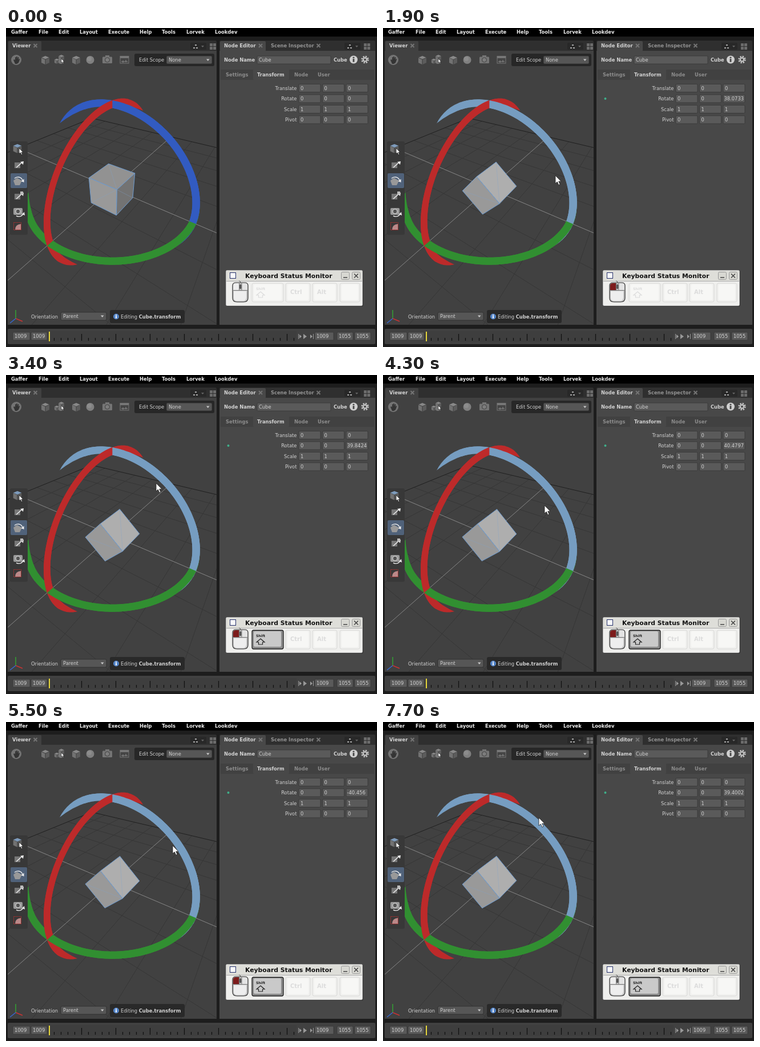
Recreate the animation shown at these times as an HTML page. Size 650 by 560 pixels, loop 8000 ms.

```html
<!DOCTYPE html>
<html lang="en">
<head>
<meta charset="utf-8">
<title>Rotate tool</title>
<style>
html, body { margin: 0; width: 100%; height: 100%; overflow: hidden; background: #1d1d1d; }
svg { display: block; width: 650px; height: 560px; }
text { font: 8.35px "DejaVu Sans", sans-serif; fill: #d2d2d2; white-space: pre; }
.b { font-weight: bold; }
</style>
</head>
<body>
<svg id="stage" viewBox="0 0 650 560"></svg>
<script>
const stage = document.getElementById('stage');
const rect = (x, y, w, h, fill, extra = '') =>
  `<rect x="${x}" y="${y}" width="${w}" height="${h}" fill="${fill}" ${extra}/>`;
const text = (x, y, s, extra = '') => `<text x="${x}" y="${y}" ${extra}>${s}</text>`;
const path = (d, fill = 'none', extra = '') => `<path d="${d}" fill="${fill}" ${extra}/>`;
const line = (d, color, w = 1) => path(d, 'none', `stroke="${color}" stroke-width="${w}"`);
const group = (x, y, s) => `<g transform="translate(${x} ${y})">${s}</g>`;
const bold = 'class="b"';

// Perspective camera orbiting the origin; units are handle radii.
const YAW = 0.608, PITCH = 0.66, DIST = 2.36, ZOOM = 332, CX = 186.2, CY = 281.7;
const sy = Math.sin(YAW), cy = Math.cos(YAW), sp = Math.sin(PITCH), cp = Math.cos(PITCH);
const depth = ([x, y, z]) => x * sy * cp + z * cy * cp + y * sp;
function project(p) {
  const [x, y, z] = p, k = ZOOM / (DIST - depth(p));
  return [CX + k * (x * cy - z * sy), CY + k * (x * sy * sp + z * cy * sp - y * cp)];
}
const poly = (points, close = 'Z') =>
  'M' + points.map(p => project(p).map(v => v.toFixed(2)).join(' ')).join('L') + close;

// Floor grid
const UNIT = 0.395;
function floorGrid() {
  const end = 5 * UNIT;
  let minor = '', edge = '', axis = '';
  for (let i = -5; i <= 5; i++) {
    const k = i * UNIT;
    const d = poly([[k, 0, -end], [k, 0, end]], '') + poly([[-end, 0, k], [end, 0, k]], '');
    if (i === 0) axis += d;
    else if (Math.abs(i) === 5) edge += d;
    else minor += d;
  }
  return line(minor, '#363636') + line(edge, '#1f1f1f') + line(axis, '#868686');
}

// Rotation rings: flat bands partly hidden behind an invisible sphere
const INNER = 0.955, OUTER = 1.022, SPHERE = 147;
const ringPoint = {
  z: (c, s) => [c, s, 0],
  x: (c, s) => [0, c, s],
  y: (c, s) => [s, 0, c]
};
const onRing = (axis, deg, r) =>
  ringPoint[axis](r * Math.cos(deg * Math.PI / 180), r * Math.sin(deg * Math.PI / 180));
function band(axis, from, to) {
  const outer = [], inner = [];
  for (let i = 0; i <= 90; i++) {
    const a = from + (to - from) * i / 90;
    outer.push(onRing(axis, a, OUTER));
    inner.unshift(onRing(axis, a, INNER));
  }
  return poly(outer.concat(inner));
}
function frontArc(axis) {
  const visible = a => depth(onRing(axis, a, 1)) > 0.4;
  let from = 45, to = 45;
  while (visible(from)) from--;
  while (visible(to)) to++;
  return [from, to];
}
function rings() {
  const paint = arc => [['z', 'inherit'], ['y', '#318f31'], ['x', '#bd2a2a']]
    .map(([axis, color]) => path(band(axis, ...arc(axis)), color)).join('');
  return `<clipPath id="outside"><path clip-rule="evenodd" d="M0 40H370V520H0Z
    M${CX - SPHERE} ${CY}a${SPHERE} ${SPHERE} 0 1 0 ${2 * SPHERE} 0a${SPHERE} ${SPHERE} 0 1 0 ${-2 * SPHERE} 0Z"/></clipPath>
    <g id="rings"><g clip-path="url(#outside)">${paint(() => [0, 360])}</g>
    ${paint(frontArc)}${paint(() => [0, 90])}</g>`;
}

// Cube, corners indexed by sign bits
const HALF = 0.195;
const FACES = ['1375', '0462', '2673', '0154', '4576', '0231'].map(s => [...s].map(Number));
function cube(deg) {
  const c = Math.cos(deg * Math.PI / 180), s = Math.sin(deg * Math.PI / 180);
  const corners = Array.from({ length: 8 }, (_, i) => {
    const x = i & 1 ? HALF : -HALF, y = i & 2 ? HALF : -HALF, z = i & 4 ? HALF : -HALF;
    return [x * c - y * s, x * s + y * c, z];
  });
  return FACES.map(face => {
    const pts = face.map(i => corners[i]);
    const normal = [0, 1, 2].map(k => pts.reduce((sum, p) => sum + p[k], 0) / 4 / HALF);
    const facing = depth(normal) - HALF / DIST;
    if (facing <= 0) return '';
    const g = Math.round(45 + 190 * facing);
    return path(poly(pts), `rgb(${g},${g},${g})`, 'stroke="#6c9bd0" stroke-width="1" stroke-linejoin="round"') +
      path(poly([pts[0], pts[2]], ''), 'none', 'stroke="#7fa3cc" stroke-width=".6" opacity=".6"');
  }).join('');
}

// Interface pieces
const ARROW = 'M0 0V14L3.3 11L5.8 16.6L8.1 15.5L5.7 10.2H10Z';
const pointer = (x, y, k) => `<path d="${ARROW}" transform="translate(${x} ${y}) scale(${k})" fill="#fff" stroke="#111"/>`;
const closeMark = (x, y) => line(`M${x - 3} ${y - 3}l6 6m0 -6l-6 6`, '#747474', 2);
const field = (x, y, w, s, id = '') => rect(x, y, w, 14, '#5a5a5a', 'rx="1.5" stroke="#353535" stroke-width=".8"') +
  text(x + 3, y + 10.3, s, id);
const boxIcon = (x, y, k, top = '#888') => `<g transform="translate(${x} ${y}) scale(${k})">` +
  path('M0 -7L7 -4L0 -1L-7 -4Z', top) + path('M-7 -3.5L-.5 -.6V8L-7 5Z', '#727272') +
  path('M7 -3.5L.5 -.6V8L7 5Z', '#5c5c5c') + '</g>';
const panelButtons = x => rect(x, 26, 28, 12, '#282828', 'rx="2"') +
  path(`M${x + 5} 34h3v2h-3zM${x + 10} 34h3v2h-3zM${x + 8} 29h3v2h-3z`, '#aaa') + path(`M${x + 19} 31h5l-2.5 3z`, '#666') +
  [0, 6].map(dx => [0, 6].map(dy => rect(x + 34 + dx, 27 + dy, 5, 5, '#6c6c6c')).join('')).join('');
const dropdown = (x, y, w, s) => rect(x, y, w, 14, '#565656', 'rx="2" stroke="#2c2c2c" stroke-width=".8"') +
  text(x + 4, y + 10, s) + path(`M${x + w - 10} ${y + 5.5}h5.5l-2.75 3.5z`, '#c8c8c8');
const info = (x, y, r, color, mark) => `<circle cx="${x}" cy="${y}" r="${r}" fill="${color}"/>` +
  rect(x - r / 5, y - r / 5, r / 2.5, r * .8, mark) + rect(x - r / 5, y - r * .68, r / 2.5, r / 3, mark);

function menuBar() {
  const items = { Gaffer: 9, File: 57, Edit: 92, Layout: 129, Execute: 179, Help: 234, Tools: 273, Lorvek: 316, Lookdev: 366 };
  return rect(0, 0, 650, 15, '#000') +
    Object.entries(items).map(([s, x]) => text(x, 10, s, bold + ' style="fill:#eee"')).join('');
}

function viewerChrome() {
  const icons =
    group(18, 56, '<circle r="9" fill="#747474"/>' + path('M-5 0l2 -1l1 2v-6h1.6v4l.6 -5h1.6v5l1 -4h1.5l-.2 5l1.3 -2l1 .6L4 5L1 7h-3Z', '#343434')) +
    boxIcon(69, 56, 1) + line('M62 52l7 3l7 -3m-7 3v8', '#4c4c4c') +
    boxIcon(97, 52, .7) + boxIcon(89, 58, .6) + '<circle cx="96" cy="59" r="4" fill="#777"/>' + pointer(97, 54, .5) +
    boxIcon(123, 56, 1) + '<circle cx="147.5" cy="56" r="7" fill="#808080"/><circle cx="146" cy="54" r="4" fill="#8c8c8c"/>' +
    rect(169, 50.5, 17, 11.5, '#757575', 'rx="1.5"') + rect(174, 48, 7, 4, '#757575') +
    '<circle cx="177.5" cy="56" r="4" fill="#7c7c7c" stroke="#414141"/>' +
    rect(200, 49.5, 15, 12.5, '#444', 'stroke="#777"') + rect(200, 50, 15, 3, '#777') + line('M202 59h11m-8 -2v4m5 -5v4', '#888');
  const scope = rect(225, 45, 140, 22, '#272727', 'rx="3"') + text(233, 58.5, 'Edit Scope') + dropdown(281, 49, 80, 'None');
  const tools = rect(7, 199, 31, 164, '#383838', 'rx="3"') + rect(8, 255, 29, 26, '#50627a', 'rx="2"') +
    boxIcon(20, 211, 1.05, '#7e9bbb') + pointer(23, 211, .7) +
    [240, 295].map(y => rect(15, y - 4, 10, 10, '#777') + line(`M18 ${y + 5}L28 ${y - 4}`, '#eee', 1.5) +
      path(`M31 ${y - 6}l-6 1l5 5z`, '#eee')).join('') +
    rect(25, 287, 5, 5, '#bbb') +
    path('M13 268l6 -5l9 5l-4 8h-8z', '#999') + line('M15 264C19 260 26 261 29 267', '#eee', 1.3) + path('M31.500 265v6l-5 -2z', '#eee') +
    rect(13, 316, 16, 12, '#999', 'rx="2"') + '<circle cx="21" cy="322" r="4" fill="#555" stroke="#ddd"/>' +
    line('M18 330q9 3 12 -4', '#eee', 1.4) + path('M32 323l1 6l-5 -2z', '#eee') +
    rect(13.5, 341.5, 13, 13, 'none', 'stroke="#b33030" stroke-dasharray="2 1"') + path('M16 354q0 -9 10 -10v10z', '#b88');
  const footer = line('M17 510V495', '#3a3', 1.4) + line('M17 510L29 515', '#c33', 1.4) + line('M17 510L7 518', '#3569d6', 1.4) +
    text(44, 509.5, 'Orientation') + dropdown(96, 499, 80, 'Parent') +
    rect(182, 495, 131, 23, '#292929', 'rx="3"') + info(193, 506.5, 5, '#5585c8', '#fff') +
    text(201, 509.5, `Editing <tspan ${bold}>Cube.transform</tspan>`);
  return icons + scope + tools + footer;
}

function viewerFrame() {
  return rect(3, 22, 366, 499, '#2f2f2f', 'rx="2"') + rect(4, 23, 58, 18, '#414141', 'rx="2"') +
    rect(3, 40, 366, 481, '#414141') + text(11, 34, 'Viewer', bold) + closeMark(51.5, 31) + panelButtons(323);
}

function nodeEditor() {
  let out = rect(374, 22, 273, 499, '#2f2f2f', 'rx="2"') + rect(375, 23, 80, 18, '#484848', 'rx="2"') +
    rect(374, 40, 273, 481, '#484848') +
    text(382, 34, 'Node Editor', bold) + closeMark(446, 31) +
    text(464, 34, 'Scene Inspector', bold + ' style="fill:#929292"') + closeMark(547.5, 31) + panelButtons(593) +
    text(382, 58.5, 'Node Name', bold) + field(440, 49, 129, 'Cube') + text(574, 58.5, 'Cube', bold) +
    info(609, 55.5, 7, '#d0d0d0', '#444') +
    '<circle cx="629" cy="55.5" r="5" fill="none" stroke="#c4c4c4" stroke-width="3.5" stroke-dasharray="2.2 1.727"/>' +
    '<circle cx="629" cy="55.5" r="3" fill="none" stroke="#c4c4c4" stroke-width="2"/>' +
    rect(376, 73, 269, 18, '#414141') + rect(433, 72, 63, 19, '#484848', 'rx="2"');
  [['Settings', 385], ['Transform', 440], ['Node', 505], ['User', 546]].forEach(([s, x]) =>
    out += text(x, 85.3, s, bold + (s === 'Transform' ? '' : ' style="fill:#8c8c8c"')));
  ['Translate', 'Rotate', 'Scale', 'Pivot'].forEach((name, row) => {
    const y = 98.5 + row * 18.5, value = name === 'Scale' ? '1' : '0';
    out += text(509.5, y + 10, name, 'text-anchor="end"');
    [513, 554.5, 596].forEach((x, col) =>
      out += field(x, y, 38, value, row === 1 && col === 2 ? 'id="angle"' : ''));
  });
  return out + '<circle id="edited" cx="389.5" cy="124" r="2" fill="#3fb08a"/>';
}

function keyCap(x, w, label, on) {
  const ink = on ? '#222' : '#dcdcdc';
  const frame = on
    ? rect(x, 448, w, 33, '#8a8a8a', 'rx="3" stroke="#222" stroke-width="1.3"') + rect(x + 3, 450, w - 7, 27, '#c9c9c9', 'rx="2"')
    : rect(x, 448, w, 33, '#f0f0ee', 'rx="3" stroke="#d9d9d7"') + rect(x + 3, 450, w - 6, 28, '#f7f7f5', 'rx="2"');
  return frame + (label === 'Shift'
    ? text(x + 7, 460, label, `${bold} style="font-size:6px;fill:${ink}"`) +
      path(`M${x + 15} 463l7 6h-3.500v4h-7v-4h-3.500z`, 'none', `stroke="${ink}" stroke-width="1.2"`)
    : text(x + 8, 467, label, `${bold} style="font-size:10px;fill:${ink}"`));
}

function keyMonitor() {
  return rect(386, 426, 240, 63, '#222', 'rx="2" opacity=".5"') +
    rect(385.5, 425.5, 239, 62, '#efefed', 'rx="2" stroke="#bbb"') + rect(386, 426, 238, 18, '#deded9') +
    line('M386 444.5h238', '#aaa') + rect(392.5, 429.5, 10, 10, '#fafafa', 'stroke="#25306b"') +
    text(419, 438.7, 'Keyboard Status Monitor', bold + ' style="font-size:10.8px;fill:#111"') +
    [587.5, 606.5].map(x => rect(x, 428.5, 14, 13, '#d8d8d2', 'rx="2" stroke="#999"')).join('') +
    line('M591 438h7', '#444', 1.5) + line('M610 431.5l7 7m0 -7l-7 7', '#444', 1.5) +
    line('M411 447q0 -3 -3 -3', '#555') +
    path('M397 452q0 -5 6 -5h15q6 0 6 5v22q0 7 -8 7h-11q-8 0 -8 -7z', '#c4c4c4', 'stroke="#333" stroke-width="1.2"') +
    path('M399 462h22v11q0 6 -6 6h-10q-6 0 -6 -6z', '#eee') +
    `<path id="button" d="M398 460v-8q0 -4 5 -4h5v12z"/>` + path('M413 448h5q5 0 5 4v8h-10z', '#e4e4e4') +
    line('M397 460.5h27M408.5 447v13M413 447v13', '#777', .9) + rect(409, 450, 3.5, 8, '#555', 'rx="1.5"') +
    `<g id="shiftOff">${keyCap(431, 55, 'Shift', false)}</g><g id="shiftOn">${keyCap(431, 55, 'Shift', true)}</g>` +
    keyCap(490, 43, 'Ctrl', false) + keyCap(537, 43, 'Alt', false) + keyCap(585, 35, '', false);
}

function timeline() {
  let ticks = '';
  for (let i = 0; i < 36; i++) ticks += `M${84.5 + i * 12} 549v${i % 5 === 4 ? -12 : -5}`;
  return rect(3, 528, 644, 27, '#414141', 'rx="2"') + rect(74, 532, 435, 19, '#3e3e3e') + line(ticks, '#101010', 1.2) +
    line('M76 533V550', '#e8d83a', 2) +
    [[12, 30], [44, 28], [541, 33], [580, 28], [611, 28]].map(([x, w], i) => field(x, 534, w, i < 3 ? '1009' : '1055')).join('') +
    line('M512.5 537v9M538.5 537v9', '#999') +
    path('M514 538v7l4 -3.500zM521 537v9l6 -4.500zM533 538v7l4 -3.500z', '#999');
}

stage.innerHTML = rect(0, 0, 650, 560, '#1d1d1d') + menuBar() + viewerFrame() +
  `<clipPath id="view"><rect x="3" y="40" width="366" height="481"/></clipPath>
   <g clip-path="url(#view)">${floorGrid()}<g id="cube"></g>${rings()}</g>` +
  viewerChrome() + nodeEditor() + timeline() + keyMonitor() +
  `<path id="cursor" d="${ARROW}" fill="#fff" stroke="#222" stroke-width=".8"/>`;

// Time, cursor x, cursor y, rotation
const KEYS = [
  [300, 258, 62, 0], [600, 246, 150, 0], [800, 248, 161, 0], [1100, 253, 169, -4.6564],
  [1900, 302, 259, -38.0733], [2100, 304, 264, -39.62], [2900, 304, 264, -39.62],
  [3400, 263, 190, -39.8424], [3800, 240, 140, -39.31], [4300, 283, 229, -40.4797],
  [4700, 298, 258, -40.9126], [5100, 193, 79, -38.8204], [5500, 292, 217, -40.456],
  [6000, 304, 326, -41.873], [6500, 288, 232, -40.3361], [6800, 245, 116, -38.7415],
  [6900, 245, 116, -38.7415], [7200, 273, 168, -39.4002], [8000, 273, 168, -39.4002]
];
function pose(t) {
  const i = Math.max(1, KEYS.findIndex(k => k[0] >= t));
  const a = KEYS[i - 1], b = KEYS[i], u = Math.max(0, (t - a[0]) / (b[0] - a[0]));
  return [1, 2, 3].map(k => a[k] + (b[k] - a[k]) * u);
}

const el = id => document.getElementById(id);
const show = (id, on) => el(id).setAttribute('visibility', on ? 'visible' : 'hidden');
let drawn = -1;
function render(ms) {
  const t = Math.floor(ms % 8000 / 100) * 100;
  if (t === drawn) return;
  drawn = t;
  const [x, y, angle] = pose(t);
  el('cube').innerHTML = cube(angle);
  el('rings').setAttribute('fill', t >= 500 ? '#769dc1' : '#325bc1');
  el('angle').textContent = String(+angle.toFixed(4)).slice(-7);
  el('angle').setAttribute('x', angle ? 597.5 : 599);
  el('cursor').setAttribute('transform', `translate(${x.toFixed(1)} ${y.toFixed(1)})`);
  el('button').setAttribute('fill', t >= 800 && t < 7700 ? '#7d1c1c' : '#eee');
  show('cursor', t >= 300);
  show('edited', angle !== 0);
  show('shiftOn', t >= 2400);
  show('shiftOff', t < 2400);
}
const start = performance.now();
function tick() {
  render(performance.now() - start);
  requestAnimationFrame(tick);
}
tick();
</script>
</body>
</html>
```
